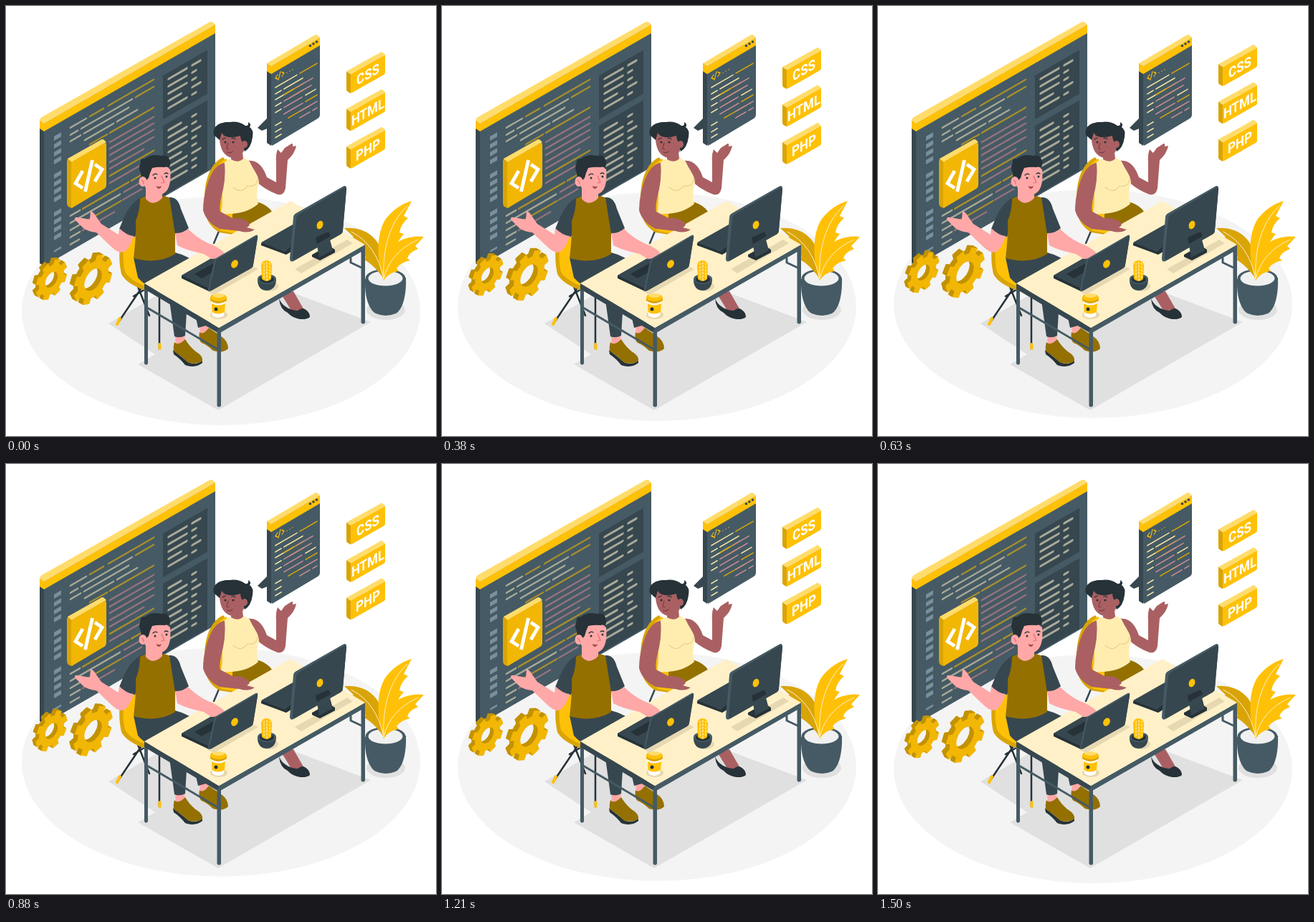
Write an HTML page that moves like this. It is 600 by 600 pixels and loops after 1.54 s.

```html
<!DOCTYPE html>
<html lang="en">
<head>
<meta charset="utf-8">
<title>Developers at work</title>
<style>
html, body { margin: 0; width: 100%; height: 100%; overflow: hidden; background: #fff; }
svg { display: block; width: 100vw; height: 100vh; }
.y { fill: #ffc107 } .amber { fill: #d9a406 } .pale { fill: #ffdc6b } .olive { fill: #947000 }
.slate { fill: #455a64 } .dark { fill: #37474f } .ink { fill: #263238 }
.cream { fill: #fff0c7 } .white { fill: #fff } .shade { fill: #e0e0e0 } .tan { fill: #e6d8b1 }
.skin { fill: #ffa8a7 } .brown { fill: #aa6062 }
.ln { fill: none; stroke-linecap: round; stroke-linejoin: round; }
.code { fill: none; stroke-width: 2.6; stroke-linecap: round; }
.c { stroke: #a9aa99 } .g { stroke: #aa8f2b } .p { stroke: #96737e }
text { font: bold 19.5px Roboto, sans-serif; fill: #fff; text-anchor: middle; }
</style>
</head>
<body>
<svg viewBox="0 0 600 600">
<ellipse class="float" cx="300" cy="425.5" rx="278" ry="159.5" fill="#f4f4f4"/>
<path class="shade" d="M143 443L262 374L400 400L509 441L296 564L184 500L208 486Z"/>

<!-- wall screen -->
<path class="dark" d="M47 160L53 164V363L47 359Z"/>
<path class="slate" d="M53 164L292 26V225L53 363Z"/>
<path class="y" d="M47 160L53 164L292 26V38L53 175L47 171Z"/>
<path class="pale" d="M47 160Q47 157 50 155L283 23Q286 21 289 23L292 26L53 164Z"/>
<g transform="matrix(1 -.577 0 1 53 164)">
  <path class="dark" d="M166 29h62v61h-62zM166 99h62v98h-62z"/>
  <path fill="none" stroke="#78909c" stroke-width="10" stroke-dasharray="6 5 6 5 6 5 6 14" d="M19 26V188"/>
  <path class="code c" id="panelRows" style="stroke-width:3.4"/>
  <path class="code c" d="M37 27h22M37 37h10M52 37h71M37 46h14M56 46h62M57 56h40M102 56h28M37 150h13M37 160h30M37 170h13M37 180h13M37 190h12M54 160h52"/>
  <path class="code g" d="M64 27h19M90 27h63M128 37h25M64 66h24M92 66h61M92 126h61M54 150h64M55 170h52M122 150h30"/>
  <path class="code p" d="M92 79h61M92 88h61M92 97h61M92 107h61M92 116h47M92 136h61M54 180h44M112 160h40M110 170h26"/>
</g>
<path class="amber" d="M85 217Q85 213 88 212L94 218V281L91 282L87 280Q85 278 85 275Z"/>
<path class="pale" d="M86 213L132 187Q135 185 137 187L140 190L92 218Z"/>
<path fill="#f2b705" d="M91 221Q91 218 94 216L136 192Q140 189 140 194V250Q140 253 137 255L95 280Q91 283 91 278Z"/>
<path fill="none" stroke="#fff" stroke-width="4.800" d="M107 230L97 247.500L107 254M120.500 215L110.500 259M124 221L134 228L124 245"/>

<!-- chat window -->
<path class="dark" d="M364 157L351 170L357 174L372 168Z"/>
<path class="dark" d="M364 80L370 84V195L364 191Z"/>
<path class="slate" d="M370 84L438 44V152Q438 155 435 157L373 194Q370 196 370 192Z"/>
<path class="y" d="M364 80L370 84L438 44V55L370 95L364 91Z"/>
<path class="pale" d="M364 80L430 41Q433 39 435 41L438 44L370 84Z"/>
<g class="dark"><circle cx="424.500" cy="55.500" r="1.800"/><circle cx="429" cy="52.800" r="1.800"/><circle cx="433.500" cy="50" r="1.800"/></g>
<g transform="matrix(1 -.577 0 1 370 84)">
  <path class="ln" stroke="#ffc107" stroke-width="1.300" d="M9 17l-3 3 3 3M13 15l-3 10M15 17l3 3-3 3M22 22h.1M26 22h.1M30 22h.1"/>
  <path class="code" stroke="#ffe9a8" style="stroke-width:1.700" d="M6 33h30M6 42h8M18 42h26M6 50h25M6 59h8M6 68h8M6 86h8M6 95h8M6 103h8M48 68h14"/>
  <path class="code" stroke="#d9a406" style="stroke-width:1.700" d="M40 33h24M18 50h28M26 59h20M48 77h16M24 86h28"/>
  <path class="code" stroke="#c98c97" style="stroke-width:1.700" d="M36 50h22M18 59h38M18 68h25M18 77h26M40 86h24M40 95h14M58 95h6"/>
</g>

<g class="float" id="tags"></g>
<g id="gears"></g>

<!-- plant -->
<ellipse class="shade" cx="530" cy="424" rx="27" ry="14"/>
<path class="slate" d="M501 381C500 409 508 425 516 429Q530 435 544 429C553 424 559 405 558 379Z"/>
<ellipse class="slate" cx="529.500" cy="380" rx="28" ry="13"/>
<ellipse cx="529.500" cy="380" rx="24" ry="10.500" fill="#f0f0f0"/>
<path class="amber" d="M528 382C533 348 519 306 472 310L485 322L481 324Q490 329 493 336L489 337Q498 342 502 351L498 353Q514 361 528 382Z"/>
<path class="y" d="M527 383C517 354 516 318 530 297Q545 278 566 272L555 293L561 296Q551 304 549 316L555 318Q545 329 543 342L546 345Q531 361 527 383Z"/>
<path class="y" d="M527 383C523 354 535 334 553 326Q568 320 583 322L571 335L575 339Q562 344 560 352L564 355Q550 358 545 366L548 370Q535 371 527 383Z"/>
<path class="ln" stroke="#fff0c7" stroke-width="1" d="M527 380C525 340 535 302 560 279M527 381Q536 343 575 326M527 380Q517 333 482 315"/>

<!-- woman -->
<path class="ln" stroke="#37474f" stroke-width="2.500" d="M298 312L290 331"/>
<path class="amber" d="M303 211C282 221 275 250 277 284Q280 306 298 316L335 322L325 240Z"/>
<path class="y" d="M307 213C288 223 280 252 282 286Q284 306 302 314L335 320L330 240Z"/>
<path class="olive" d="M316 290L350 273Q366 278 372 288L345 308L316 298Z"/>
<path class="brown" d="M384 402L401 398L416 424L400 428Z"/>
<path class="ink" d="M381 408C386 421 400 425 407 425Q413 420 417 423Q424 427 424 434C417 440 401 437 393 428Q382 423 381 408Z"/>
<path class="brown" d="M338 216C350 214 359 224 364 239L377 246L377 218Q376 207 379 200L384 205L389 198L397 193Q401 190 400 196L405 195Q403 206 393 215L390 254Q388 265 379 263Q357 255 344 239Z"/>
<path fill="#ffedb0" d="M304 219Q311 211 318 215Q324 219 331 211L340 217C345 229 353 236 353 247Q348 262 352 276Q334 292 300 290Q304 267 300 248Z"/>
<path class="ln" stroke="#e8d08b" stroke-width="1.200" d="M317 253Q328 263 337 251Q350 253 351 241"/>
<path class="brown" d="M314 197V214Q324 220 331 213L330 204Z"/>
<path class="brown" d="M298 174C296 201 306 212 318 212C330 211 335 200 335 184Q319 169 298 174Z"/>
<path class="ink" d="M290 180C287 167 300 161 312 162Q324 160 334 167Q339 168 338 162Q343 165 340 169Q346 173 344 183Q342 198 333 203Q331 200 333 193Q327 188 327 181Q307 187 301 177L298 187Z"/>
<ellipse class="brown" cx="333" cy="193" rx="4" ry="5"/>
<g class="ink"><circle cx="306" cy="190" r="1.500"/><circle cx="317" cy="190" r="1.500"/></g>
<path class="ln" stroke="#263238" stroke-width="1.200" d="M302 186l4-2M315 185q3-2 5 1"/>
<path class="ln" stroke="#7d3d42" stroke-width="1.200" d="M310 191l-2 8 3 1M309 204q4 2 7-1"/>

<!-- man -->
<path class="ln" stroke="#263238" stroke-width="2.500" d="M192 389L155 444M178 405L196 394M214 402V478M181 384L200 432"/>
<path class="ln" stroke="#ffc107" stroke-width="4" d="M159 436L155 444M214.500 472V478"/>
<path class="amber" d="M176 303C156 319 156 352 161 374Q168 388 197 398L230 388L190 320Z"/>
<path class="y" d="M180 302C163 320 161 350 166 371Q174 384 200 393L230 383L192 320Z"/>
<path class="skin" d="M270 445L281 443L283 457L271 459ZM236 458L249 456L250 473L237 474Z"/>
<path class="olive" d="M270 455Q275 460 283 449L299 460Q310 467 310 478Q303 485 289 481Q281 473 273 470Q268 466 270 455Z"/>
<path class="ink" d="M233 480Q246 490 254 497Q264 502 274 495V498Q264 506 250 501Q243 492 234 486Z"/>
<path class="olive" d="M235 469Q240 475 250 465Q258 478 269 485Q275 490 274 495Q264 502 252 496Q246 489 236 483Q232 480 235 469Z"/>
<path class="dark" d="M178 351Q210 358 236 344Q262 350 283 375L286 444L268 449L258 403L253 411L250 460Q242 464 235 461L227 403Q197 394 184 379Z"/>
<path class="dark" d="M192 266C174 272 167 289 158 311Q167 321 180 322L192 290Z"/>
<path class="olive" d="M187 269Q195 264 200 266Q210 271 220 265L231 268Q238 272 236 295V346Q212 361 178 352Q182 318 181 300Q187 285 187 269Z"/>
<path class="skin" d="M158 310Q168 320 178 321Q173 338 165 343Q157 346 147 336L126 316Q115 315 108 310L96 298Q95 294 101 295L117 298L118 286Q123 288 126 294L133 304L157 319Z"/>
<path class="skin" d="M195 245V269Q205 281 218 268V258Z"/>
<path class="skin" d="M193 227V249Q197 263 211 264C226 263 231 251 229 228Q211 212 193 227Z"/>
<path class="ink" d="M188 233Q184 225 188 219Q186 213 194 213Q203 206 216 209Q225 207 228 214Q230 219 228 226Q224 223 222 225Q212 224 204 226Q201 232 199 240L194 245Q188 241 188 233Z"/>
<ellipse class="skin" cx="191" cy="245" rx="5.500" ry="7"/>
<g class="ink"><circle cx="208" cy="240" r="1.500"/><circle cx="224" cy="238" r="1.500"/></g>
<path class="ln" stroke="#263238" stroke-width="1.300" d="M205 236q3-3 6-1M221 234q3-2 5 0"/>
<path class="ln" stroke="#d96f75" stroke-width="1.200" d="M217 237l4 9-4 1M189 243q3 1 3 5"/>
<path d="M210 251q4 2 7 0q-1 4-4 4q-3-1-3-4z" fill="#a24e4e"/>

<!-- desk -->
<path class="ln" stroke="#455a64" stroke-width="3" d="M197 421L297 480M481 352V358L498 366"/>
<path class="slate" d="M193 390h5V499q-2.500 3-5 0zM495.500 336h5.500V442q-2.700 3-5.500 0z"/>
<path class="slate" d="M297 449L501 333V340L297 457Z"/>
<path class="dark" d="M193 387L297 449V457L193 395Z"/>
<path class="slate" d="M294.500 452h5.500V558q-2.700 3-5.500 0z"/>
<path class="cream" d="M193 387L397 272L501 333L297 449Z"/>

<!-- desk items -->
<path class="tan" d="M403 367L476 326L484 331L412 373ZM282 399L346 364L352 367L290 403Z"/>
<path class="ink" d="M356 331L400 306L420 318V329L391 347L356 334Z"/>
<path class="dark" d="M356 330L400 305L419 317L389 343Z"/>
<path class="ink" d="M427 347L450 334L459 340V344L438 355L427 350Z"/>
<path class="dark" d="M432 323L449 315L456 341L437 351Z"/>
<path class="slate" d="M401 295Q401 291 405 289L470 252Q475 249 475 255L470 313Q470 317 466 319L401 356Q396 358 396 352Z"/>
<path class="dark" d="M405 296Q405 293 408 291L471 254Q475 251 475 256L470 313Q470 317 466 319L404 354Q400 357 400 351Z"/>
<path class="ink" d="M432 323L450 315L453 321L434 332Z"/>
<ellipse class="y" cx="438" cy="305.500" rx="4.200" ry="6" transform="rotate(20 438 305.500)"/>

<ellipse class="tan" cx="367" cy="391" rx="13" ry="7"/>
<path class="dark" d="M351 382C351 393 357 397 364 397C371 397 377 392 377 381Z"/>
<ellipse class="slate" cx="364" cy="381" rx="13" ry="7"/><ellipse class="ink" cx="364" cy="381.500" rx="10" ry="5"/>
<path class="y" d="M356 362Q357 355 363.500 355Q370 355 371 362L370 381Q364 387 357 381Z"/>
<path class="ln" stroke="#fff0c7" stroke-width="1.300" stroke-dasharray="2 2.500" d="M360 359V381M364 358V383M368 359V381"/>

<ellipse class="tan" cx="297" cy="431" rx="12" ry="6"/>
<path class="white" d="M286 409L288 432Q296 438 304 432L306 409Z"/>
<path class="y" d="M287 415Q296 420 306 415L305 427Q296 432 287.500 427Z"/>
<circle class="ink" cx="293" cy="423" r="2.500"/>
<path class="amber" d="M285 407V411Q296 419 308 411V407L305 403H287Z"/>
<ellipse class="y" cx="296.500" cy="407" rx="11.500" ry="5"/><ellipse class="pale" cx="296.500" cy="404" rx="8.500" ry="3"/>

<path class="ink" d="M245 376L295 348L325 365L283 398L245 380Z"/>
<path class="dark" d="M245 376L295 347L323 364L283 394Z"/>
<path class="ink" d="M263 374L295 356L305 362L273 380Z"/>

<!-- arms above the desk -->
<path class="dark" d="M228 267Q240 266 244 283L255 310Q248 317 236 318Z"/>
<path class="skin" d="M236 317Q248 317 254 311Q266 323 280 330Q298 337 304 344L309 351Q297 352 287 353L276 346Q252 341 239 334Z"/>
<path class="brown" d="M305 219C293 220 285 235 280 252Q275 269 275 285Q279 301 298 311L326 314Q338 318 347 312L336 309Q343 305 337 301Q329 295 316 296L299 287Q297 280 302 260Q307 240 305 219Z"/>
<path class="slate" d="M290 357Q290 354 293 352L348 320Q352 318 351 323L345 361Q345 364 342 366L286 397Q281 400 282 395Z"/>
<path class="dark" d="M292 358Q292 355 295 353L348 322Q352 319 351 324L345 361Q345 364 342 366L287 397Q283 399 284 395Z"/>
<ellipse class="y" cx="319" cy="360" rx="4.500" ry="6" transform="rotate(30 319 360)"/>
</svg>
<script>
const PERIOD = 1540, LEAD = 40, RISE = 10.4, SWING = 8;
const iso = (x, y) => `matrix(.87 -.5 0 1 ${x} ${y})`;

// Long and short bars in the two side panels
let rows = '';
for (let i = 0; i < 15; i++) {
  const v = 38 + i * 10.2;
  if (v < 84 || v > 106) rows += `M174 ${v}h${i % 4 == 3 ? 17 : 25}M207 ${v}h${i % 3 ? 5 : 11}`;
}
document.getElementById('panelRows').setAttribute('d', rows);

document.getElementById('tags').innerHTML = ['CSS', 'HTML', 'PHP'].map((name, i) => `
  <g transform="translate(475 ${64 + i * 52.5})">
    <path class="amber" d="M0 27L6 31V58L1 55Q0 54 0 52Z"/>
    <path class="y" d="M6 31L54 4V29Q54 31 52 32L8 57Q6 58 6 56Z"/>
    <path class="pale" d="M0 27L47 1Q49-1 51 1L54 4L6 31Z"/>
    <text transform="matrix(.87 -.5 0 1 30 38)">${name}</text>
  </g>`).join('');

// Eight flared teeth around a round hole
function gearPath(r, hole) {
  const root = r * .78;
  const at = (radius, deg) => {
    const a = deg * Math.PI / 180;
    return `${(radius * Math.cos(a)).toFixed(2)} ${(radius * Math.sin(a)).toFixed(2)}`;
  };
  let d = '';
  for (let k = 0; k < 8; k++) {
    const a = k * 45;
    d += `${k ? 'L' : 'M'}${at(root, a - 13)}L${at(r, a - 10)}L${at(r, a + 10)}L${at(root, a + 13)}`
       + `A${root} ${root} 0 0 1 ${at(root, a + 32)}`;
  }
  return `${d}ZM${hole} 0A${hole} ${hole} 0 1 0 ${-hole} 0A${hole} ${hole} 0 1 0 ${hole} 0Z`;
}

const gears = [
  { x: 63.5, y: 382, r: 25, hole: 10.5, depth: 5 },
  { x: 121.5, y: 382, r: 31, hole: 14.5, depth: 6 }
];
const gearBox = document.getElementById('gears');
for (const g of gears) {
  const d = gearPath(g.r, g.hole);
  for (let s = g.depth; s >= 0; s -= .5) {
    const color = s ? '#c29205' : '#f2b705';
    gearBox.innerHTML += `<g transform="${iso(g.x - s, g.y - s * .58)}"><path class="spin" fill="${color}" fill-rule="evenodd" stroke="${color}" stroke-linejoin="round" d="${d}"/></g>`;
  }
}

const floating = [...document.querySelectorAll('.float'), gearBox];
const spinners = document.querySelectorAll('.spin');
function draw() {
  const lift = (1 - Math.cos(2 * Math.PI * (performance.now() + LEAD) / PERIOD)) / 2;
  for (const el of floating) el.setAttribute('transform', `translate(0 ${-RISE * lift})`);
  for (const el of spinners) el.setAttribute('transform', `rotate(${22 + SWING * lift})`);
  requestAnimationFrame(draw);
}
draw();
</script>
</body>
</html>
```
